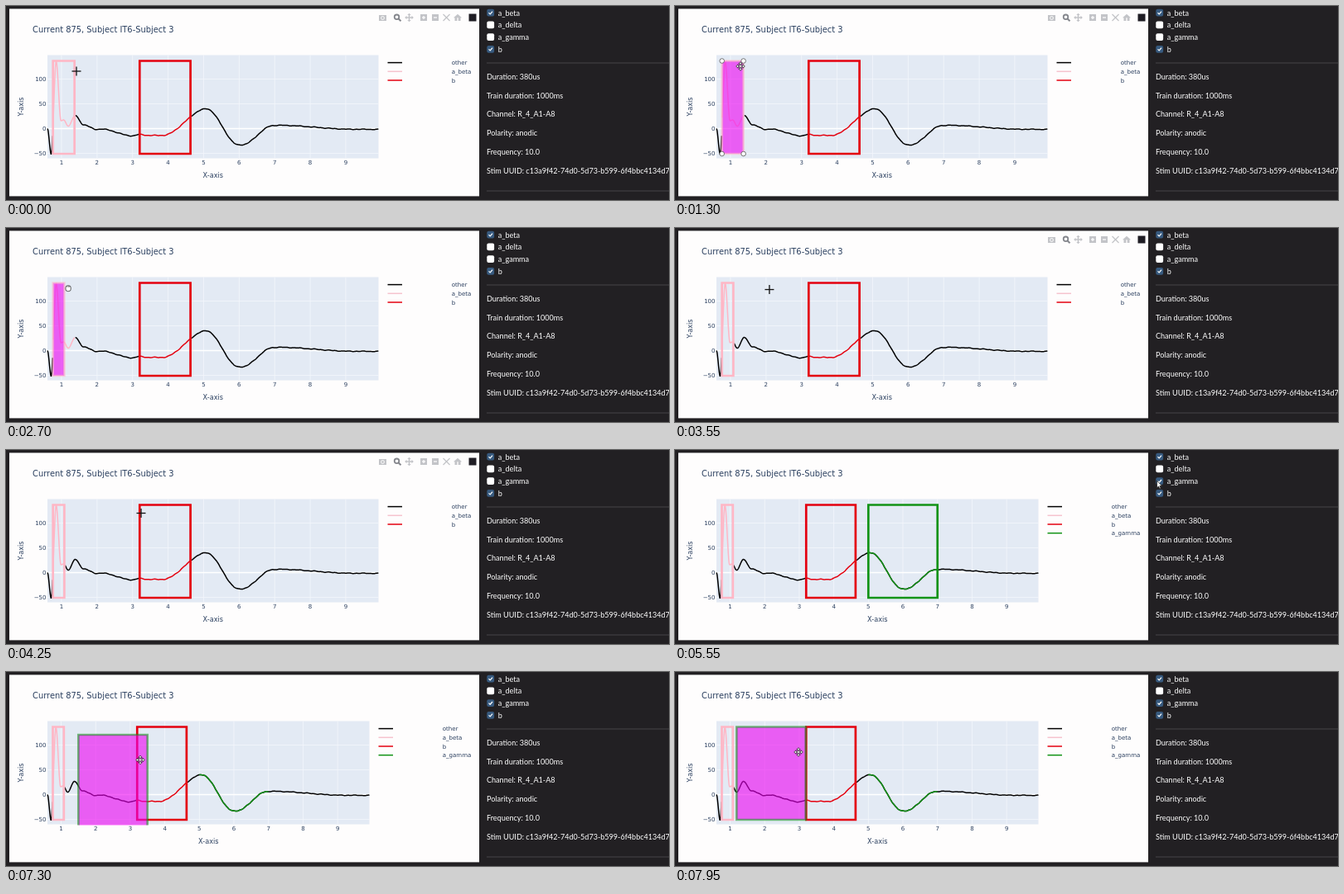
Animation, 800 px wide and 235 px high, one loop 8 s. Source, as an HTML page with a canvas:

```html
<!DOCTYPE html>
<html lang="en">
<head>
<meta charset="utf-8">
<title>Signal labelling</title>
<style>
html, body { margin: 0; width: 100%; height: 100%; overflow: hidden; background: #222023; }
canvas { display: block; }
</style>
</head>
<body>
<canvas id="stage" width="800" height="235"></canvas>
<script>
const c = document.getElementById('stage').getContext('2d');
const LOOP = 8000, STEP = 50;
const TOP = 59.5, BOTTOM = 184.5, LEFT = 50, ZERO = 148.5;
const X_MIN = 0.604, X_MAX = 9.92;
const BOX_TOP = 66.5, BOX_H = 112.5;
const INK = '#2a3f5f', PINK = '#ffb6c5', RED = '#e4000f', GREEN = '#129316';
const PLOT_FONT = '"DejaVu Sans", sans-serif';
const SMALL = '7px ' + PLOT_FONT, AXIS = '8.1px ' + PLOT_FONT, TITLE = '9.88px ' + PLOT_FONT;
const SIDE_FONT = '9.05px Lato, sans-serif';

// Moments at which the state switches
const PICK_BETA = 1000, GRAB = 1700, DROP = 2850, REDRAW = 3050;
const CHECK = 5300, ADD_GAMMA = 5500, PICK_GAMMA = 6900, DRAG_GAMMA = 7000;

// Turning points of the signal: axis value, height above zero in pixels
const turns = [
  [X_MIN, 0], [0.71, -31], [0.85, 81.5], [0.985, 9.5], [1.06, 10.5], [1.19, 3], [1.385, 16],
  [1.62, 4.6], [1.98, -1], [2.12, -0.6], [3, -8.8], [3.2, -7], [3.45, -8.3], [3.85, -8.2],
  [5.08, 24], [5.98, -19.7], [6.08, -19.6], [6.95, 3.6], [7.1, 4], [9.2, -0.8], [X_MAX, -1]
];

// Cursor moves: start, end, destination
const moves = [
  [500, 1000, 79, 73], [1400, 1700, 87, 73], [1850, 2500, 75, 73], [2950, 4250, 163, 76.5],
  [4450, 5150, 584, 37], [5500, 6400, 306, 66], [6750, 6900, 308, 97]
];

function ease(t, from, to) {
  const u = Math.min(1, Math.max(0, (t - from) / (to - from)));
  return u * u * (3 - 2 * u);
}

function signal(x) {
  let h = turns[0][1];
  for (let i = 1; i < turns.length; i++) {
    h += (turns[i][1] - turns[i - 1][1]) * ease(x, turns[i - 1][0], turns[i][0]);
  }
  const ripple = 0.45 * Math.sin(23 * x) * Math.sin(9.1 * x) * ease(x, 1.4, 1.8);
  return ZERO - h - ripple;
}

function scene(t) {
  const narrow = t >= ADD_GAMMA;
  const scale = narrow ? 41.7 : 42.87;
  const out = ease(t, DRAG_GAMMA, 7300), back = ease(t, 7300, 7950);
  const gx = -146 * out - 13 * back, gy = 9.5 * (out - back);
  let mx = 85, my = 79;
  for (const [from, to, x, y] of moves) {
    const u = ease(t, from, to);
    mx += (x - mx) * u;
    my += (y - my) * u;
  }
  return {
    t, narrow, gx, gy,
    mx: mx + gx,
    my: my + gy,
    right: narrow ? 438.5 : 449.5,
    X: v => LEFT + (v - X_MIN) * scale,
    betaEnd: 1.365 - 0.285 * ease(t, 1850, 2500),
    betaActive: t >= PICK_BETA && t < REDRAW,
    betaDrag: t >= GRAB && t < DROP,
    gammaActive: t >= PICK_GAMMA,
    gammaDrag: t >= DRAG_GAMMA
  };
}

function text(s, x, y, font, color, align = 'left') {
  c.font = font;
  c.fillStyle = color;
  c.textAlign = align;
  c.fillText(s, x, y);
}

function stroke(color, width) {
  c.strokeStyle = color;
  c.lineWidth = width;
  c.stroke();
}

function line(x1, y1, x2, y2, color, width) {
  c.beginPath();
  c.moveTo(x1, y1);
  c.lineTo(x2, y2);
  stroke(color, width);
}

function rect(x, y, w, h, color) {
  c.fillStyle = color;
  c.fillRect(x, y, w, h);
}

function ring(x, y, r, color, width, fill = 'transparent') {
  c.beginPath();
  c.arc(x, y, r, 0, 7);
  c.fillStyle = fill;
  c.fill();
  stroke(color, width);
}

function shape(pts, fill, edge) {
  c.beginPath();
  pts.forEach(([x, y]) => c.lineTo(x, y));
  c.closePath();
  c.fillStyle = fill;
  c.fill();
  if (edge) stroke(edge, 0.8);
}

function trace(s, from, to, color) {
  c.beginPath();
  for (let x = from; x < to; x += 0.01) c.lineTo(s.X(x), signal(x));
  c.lineTo(s.X(to), signal(to));
  c.lineJoin = 'round';
  stroke(color, 1.5);
}

function box(x1, x2, dy, color, active) {
  c.save();
  c.beginPath();
  c.rect(LEFT - 1, TOP, 402, BOTTOM - TOP + 1);
  c.clip();
  if (active) {
    rect(x1, BOX_TOP + dy, x2 - x1, BOX_H, 'rgba(238,0,244,0.6)');
    c.globalAlpha = 0.55;
  }
  c.lineJoin = 'miter';
  c.beginPath();
  c.rect(x1, BOX_TOP + dy, x2 - x1, BOX_H);
  stroke(color, 2.7);
  c.restore();
}

function handles(x1, x2) {
  for (const x of [x1, x2]) {
    for (const y of [BOX_TOP, BOX_TOP + BOX_H]) ring(x, y, 2.8, '#555', 0.8, '#fff');
  }
}

function axes(s) {
  rect(LEFT, TOP, s.right - LEFT, BOTTOM - TOP, '#e3eaf4');
  for (let v = 1; v <= 9; v++) {
    line(s.X(v), TOP, s.X(v), BOTTOM, '#f4f7fb', 0.8);
    text(v, s.X(v), 192.4, SMALL, INK, 'center');
  }
  for (let v = -50; v <= 100; v += 50) {
    const y = ZERO - v * 0.6;
    line(LEFT, y, s.right, y, v ? '#f4f7fb' : '#fff', v ? 0.8 : 1.3);
    text(String(v).replace('-', '\u2212'), 48.5, y + 2.6, SMALL, INK, 'right');
  }
  text('X-axis', (LEFT + s.right) / 2, 208, AXIS, INK, 'center');
  c.save();
  c.translate(20.5, 122);
  c.rotate(-Math.PI / 2);
  text('Y-axis', 0, 0, AXIS, INK, 'center');
  c.restore();
  text('Current 875, Subject IT6-Subject 3', 32, 32.1, TITLE, INK);
}

function legend(s) {
  const rows = [['other', '#000'], ['a_beta', '#f5c3cd'], ['b', RED]];
  if (s.narrow) rows.push(['a_gamma', GREEN]);
  const x = s.right + 11;
  rows.forEach(([name, color], i) => {
    const y = 68.6 + i * 10.7;
    line(x, y, x + 17.5, y, color, 1.5);
    text(name, x + 77.3, y + 2.7, SMALL, INK);
  });
}

function toolbar() {
  const grey = '#c3c4c8', dark = '#85878d', y = 14;
  rect(450, 11, 9, 7, grey);
  ring(454.5, 14.5, 1.9, '#fff', 1);
  ring(471.5, 13.3, 2.8, dark, 1.8);
  line(473.6, 15.6, 476.5, 18.3, dark, 2);
  c.save();
  c.translate(486.5, y);
  shape(fourArrows(), grey);
  c.restore();
  for (const x of [500, 514]) {
    rect(x, 10, 8, 8, grey);
    line(x + 2, y, x + 6, y, '#fff', 1.2);
  }
  line(504, 12, 504, 16, '#fff', 1.2);
  line(527.5, 10, 535.5, 18, grey, 1.3);
  line(535.5, 10, 527.5, 18, grey, 1.3);
  shape([[540, 14.3], [545, 9.8], [550, 14.3]], grey);
  rect(541.5, 14, 2.8, 4, grey);
  rect(545.7, 14, 2.8, 4, grey);
  rect(558.5, 9.5, 9, 9, '#1f1d24');
}

function sidebar(t) {
  ['a_beta', 'a_delta', 'a_gamma', 'b'].forEach((name, i) => {
    const y = 8.2 + i * 14.7;
    const on = name === 'a_gamma' ? t >= CHECK : name !== 'a_delta';
    c.beginPath();
    c.roundRect(580.3, y - 4.4, 8.8, 8.8, 2);
    c.fillStyle = on ? '#375a7f' : '#fff';
    c.fill();
    if (on) {
      line(582.5, y, 584.4, y + 1.9, '#fff', 1.2);
      line(584, y + 1.9, 587, y - 1.6, '#fff', 1.2);
    }
    text(name, 593.8, y + 3.4, SIDE_FONT, '#fff');
  });
  for (const y of [69, 224]) line(580, y, 800, y, '#464448', 1);
  ['Duration: 380us', 'Train duration: 1000ms', 'Channel: R_4_A1-A8', 'Polarity: anodic',
    'Frequency: 10.0', 'Stim UUID: c13a9f42-74d0-5d73-b599-6f4bbc4134d7']
    .forEach((row, i) => text(row, 580, 88.9 + i * 22.75, SIDE_FONT, '#fff'));
}

function fourArrows() {
  const arm = [[-0.8, -0.8], [-0.8, -3], [-2.2, -3], [0, -5.3], [2.2, -3], [0.8, -3]];
  const pts = [];
  for (let k = 0; k < 4; k++) pts.push(...arm.map(([x, y]) => [[x, y], [-y, x], [-x, -y], [y, -x]][k]));
  return pts;
}

const cursors = {
  cross() {
    line(-5.5, 0, 5.5, 0, '#111', 1.3);
    line(0, -5.5, 0, 5.5, '#111', 1.3);
  },
  arrow() {
    shape([[0, 0], [0, 8.5], [2, 6.8], [3.3, 9.8], [4.7, 9.2], [3.4, 6.3], [6, 6.1]], '#fff', '#222');
  },
  move() {
    shape(fourArrows(), '#fff', '#222');
  },
  hand() {
    c.beginPath();
    c.roundRect(-3, -3.2, 6.2, 6.8, 2.4);
    c.fillStyle = '#fff';
    c.fill();
    stroke('#333', 0.8);
    for (const x of [-1, 0.4, 1.8]) line(x, -3, x, -1.2, '#333', 0.5);
  }
};

function cursorKind(s) {
  if (s.betaDrag) return 'hand';
  if (s.betaActive && s.t < GRAB || s.gammaActive) return 'move';
  const onPlot = s.mx < s.right && s.my > BOX_TOP + 2;
  return onPlot && !s.betaActive ? 'cross' : 'arrow';
}

function draw(t) {
  const s = scene(t);
  const { X } = s;
  const cut = t < REDRAW ? 1.39 : 1.1;

  rect(0, 0, 800, 235, '#222023');
  rect(4, 3.4, 567, 227, '#fefdfd');
  axes(s);
  legend(s);

  trace(s, X_MIN, 0.75, '#000');
  trace(s, 0.77, cut - 0.02, PINK);
  trace(s, cut, 3.2, '#000');
  trace(s, 3.21, 4.62, RED);
  trace(s, 4.64, X_MAX, '#000');
  if (s.narrow) trace(s, 5, 7, GREEN);

  box(X(0.76), X(s.betaEnd), 0, PINK, s.betaActive);
  box(X(3.2), X(4.63), 0, RED, false);
  if (s.narrow) box(X(5) + s.gx, X(7) + s.gx, s.gy, GREEN, s.gammaActive);
  if (s.betaActive && !s.betaDrag) handles(X(0.76), X(s.betaEnd));
  if (s.gammaActive && !s.gammaDrag) handles(X(5), X(7));

  sidebar(t);
  if (s.mx < 571 && !s.betaDrag && !s.gammaDrag) toolbar();

  c.save();
  c.translate(s.mx, s.my);
  c.lineJoin = 'round';
  cursors[cursorKind(s)]();
  c.restore();
}

const begin = performance.now();
function tick() {
  const t = (performance.now() - begin) % LOOP;
  draw(Math.floor(t / STEP) * STEP);
  requestAnimationFrame(tick);
}
tick();
</script>
</body>
</html>
```
